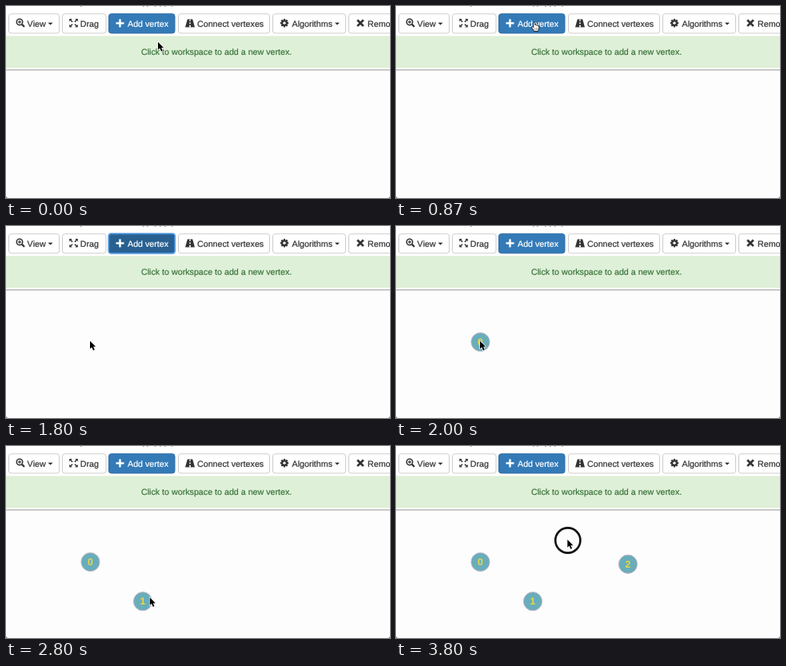
Recreate the animation shown at these times as an HTML page with a canvas. Size 480 by 240 pixels, loop 3870 ms.

```html
<!DOCTYPE html>
<html lang="en">
<head>
<meta charset="utf-8">
<title>Adding vertexes</title>
<style>
html, body { margin: 0; width: 100%; height: 100%; overflow: hidden; background: #fff; }
canvas { display: block; width: 480px; height: 240px; }
</style>
</head>
<body>
<canvas id="stage" width="480" height="240"></canvas>
<script>
const ctx = document.getElementById('stage').getContext('2d');
const LOOP = 3870, FPS = 15;
const FONT = '"Liberation Sans", Arial, sans-serif';
const INK = '#333';

// Pointer tip: time, x, y
const PATH = [
  [0, 190, 45], [200, 190, 45], [800, 173, 20], [1200, 171, 21.5], [1580, 171, 21.5],
  [1800, 105, 143.7], [2130, 105, 143.7], [2330, 170, 193], [2730, 170, 193],
  [3130, 289.5, 147], [3400, 289.5, 147], [3730, 214.3, 117], [LOOP, 214.3, 117]
];
const VERTEXES = [
  { x: 105.5, y: 145, born: 1995 },
  { x: 171, y: 194.2, born: 2460 },
  { x: 290, y: 147.7, born: 3195 }
];
const RINGS = [
  { x: 105, y: 145, from: 1860, to: 1995 },
  { x: 214.8, y: 118, from: 3795, to: LOOP }
];
const FOCUS = { from: 1195, to: 1860 };

const during = (t, span) => t >= span.from && t < span.to;

function pointerAt(t) {
  const i = PATH.findIndex(p => p[0] > t);
  const a = PATH[i - 1], b = PATH[i];
  const u = (t - a[0]) / (b[0] - a[0]);
  const e = u * u * (3 - 2 * u);
  return { x: a[1] + (b[1] - a[1]) * e, y: a[2] + (b[2] - a[2]) * e };
}

function label(text, x, y, color = INK) {
  ctx.font = '10.7px ' + FONT;
  ctx.fontKerning = 'none';
  ctx.textRendering = 'geometricPrecision';
  ctx.textAlign = 'left';
  ctx.fillStyle = ctx.strokeStyle = color;
  ctx.lineWidth = 0.22;
  ctx.fillText(text, x, y);
  ctx.strokeText(text, x, y);
}

function poly(points, color) {
  ctx.beginPath();
  points.forEach(p => ctx.lineTo(p[0], p[1]));
  ctx.closePath();
  ctx.fillStyle = color;
  ctx.fill();
}

function line(x1, y1, x2, y2, color, width) {
  ctx.beginPath();
  ctx.moveTo(x1, y1);
  ctx.lineTo(x2, y2);
  ctx.strokeStyle = color;
  ctx.lineWidth = width;
  ctx.stroke();
}

function circle(x, y, r) {
  ctx.beginPath();
  ctx.arc(x, y, r, 0, Math.PI * 2);
}

function box(x, w, fill, stroke, width = 1) {
  ctx.beginPath();
  ctx.roundRect(x, 9.8, w, 24.2, 3);
  ctx.fillStyle = fill;
  ctx.fill();
  ctx.strokeStyle = stroke;
  ctx.lineWidth = width;
  ctx.stroke();
}

const caret = x => poly([[x, 20.7], [x + 6, 20.7], [x + 3, 23.7]], INK);

function zoomIcon(x, y) {
  circle(x - 1, y - 1, 3.7);
  ctx.strokeStyle = INK;
  ctx.lineWidth = 1.6;
  ctx.stroke();
  line(x + 1.9, y + 1.9, x + 5, y + 5, INK, 2.2);
  line(x - 3, y - 1, x + 1, y - 1, INK, 1.2);
  line(x - 1, y - 3, x - 1, y + 1, INK, 1.2);
}

function expandIcon(x, y) {
  for (const sx of [-1, 1]) for (const sy of [-1, 1]) {
    const at = (a, b) => [x + sx * a, y + sy * b];
    poly([at(5.3, 5.3), at(1.8, 5.3), at(5.3, 1.8)], INK);
    line(...at(1.4, 1.4), ...at(4, 4), INK, 1.4);
  }
}

function plusIcon(x, y) {
  line(x - 5, y, x + 5, y, '#fff', 2.4);
  line(x, y - 5, x, y + 5, '#fff', 2.4);
}

function roadIcon(x, y) {
  poly([[x - 3.2, y - 5], [x + 3.2, y - 5], [x + 6, y + 5], [x - 6, y + 5]], INK);
  line(x, y - 5, x, y - 2.5, '#fff', 1.3);
  line(x, y - 1, x, y + 1, '#fff', 1.5);
  line(x, y + 2.6, x, y + 5, '#fff', 1.8);
}

function cogIcon(x, y) {
  for (let i = 0; i < 4; i++) {
    const a = i * Math.PI / 4, dx = Math.cos(a) * 5.2, dy = Math.sin(a) * 5.2;
    line(x - dx, y - dy, x + dx, y + dy, INK, 2.2);
  }
  circle(x, y, 3.9);
  ctx.fillStyle = INK;
  ctx.fill();
  circle(x, y, 1.7);
  ctx.fillStyle = '#fff';
  ctx.fill();
}

function crossIcon(x, y) {
  line(x - 3.8, y - 3.8, x + 3.8, y + 3.8, INK, 2.7);
  line(x - 3.8, y + 3.8, x + 3.8, y - 3.8, INK, 2.7);
}

function toolbar(focused) {
  // Descenders of the text line cut off by the top edge
  ctx.fillStyle = '#999';
  for (const x of [93, 171, 176, 186, 192, 198, 207]) ctx.fillRect(x, 0, 1.5, 1);

  box(3.5, 63, '#fff', '#ccc');
  zoomIcon(18, 21);
  label('View', 26.5, 25.5);
  caret(52.5);

  box(70.5, 54.5, '#fff', '#ccc');
  expandIcon(84.5, 21.3);
  label('Drag', 92.8, 25.5);

  if (focused) {
    box(128.5, 82.5, '#286090', 'rgba(91, 157, 217, 0.45)', 3);
    box(128.5, 82.5, '#286090', '#4a94dd', 1.4);
  } else {
    box(128.5, 82.5, '#337ab7', '#2e6da4');
  }
  plusIcon(142.5, 21.5);
  label('Add vertex', 152, 25.5, '#fff');

  box(215.5, 114, '#fff', '#ccc');
  roadIcon(230, 21.5);
  label('Connect vertexes', 239, 25.5);

  box(333.5, 91, '#fff', '#ccc');
  cogIcon(348, 21.3);
  label('Algorithms', 357.5, 25.5);
  caret(411);

  box(428.5, 80, '#fff', '#ccc');
  crossIcon(443, 21.3);
  label('Remove', 452, 25.5);
}

function page(focused) {
  ctx.fillStyle = '#fff';
  ctx.fillRect(0, 0, 480, 240);
  toolbar(focused);
  ctx.fillStyle = '#d6e9c6';
  ctx.fillRect(0, 37.6, 480, 39.4);
  ctx.fillStyle = '#dff0d8';
  ctx.fillRect(0, 38.2, 480, 38.2);
  label('Click to workspace to add a new vertex.', 169, 61, '#3c763d');
  ctx.fillStyle = '#fefdfe';
  ctx.fillRect(0, 80, 480, 160);
  line(0, 79.8, 480, 79.8, '#aaa', 1.2);
  poly([[0, 238], [2, 240], [0, 240]], '#888');
  poly([[480, 238], [478, 240], [480, 240]], '#888');
}

function vertex(v, name) {
  circle(v.x, v.y, 11.6);
  ctx.fillStyle = '#68aeba';
  ctx.fill();
  ctx.strokeStyle = '#c7b7c7';
  ctx.lineWidth = 1;
  ctx.stroke();
  ctx.font = 'bold 12.2px ' + FONT;
  ctx.textAlign = 'center';
  ctx.fillStyle = '#f0d543';
  ctx.fillText(name, v.x, v.y + 4.2);
}

function ring(r) {
  circle(r.x, r.y, 15.6);
  ctx.strokeStyle = '#111';
  ctx.lineWidth = 2.6;
  ctx.stroke();
}

const ARROW = new Path2D('M0 0V11.2L2.6 8.8L4.6 13.4L6.6 12.5L4.7 8.1H8.1Z');
const HAND = new Path2D('M-1.2 1Q0 -1.2 1.2 1V4.2Q2.6 3.5 3.2 4.7Q4.6 4.1 5.1 5.3Q6.8 5 6.8 7V9Q6.6 10.6 5.6 11.6V13H-.6V11.8L-4 7.8Q-4.4 6 -2.6 6.5L-1.2 7.8Z');

function pointer(p) {
  const hand = p.x > 128 && p.x < 211 && p.y > 9 && p.y < 35;
  ctx.save();
  ctx.translate(p.x, p.y);
  ctx.scale(0.88, 0.88);
  ctx.lineJoin = 'round';
  ctx.strokeStyle = hand ? '#111' : '#fff';
  ctx.lineWidth = hand ? 1 : 1.5;
  ctx.fillStyle = hand ? '#fff' : '#000';
  if (hand) {
    ctx.fill(HAND);
    ctx.stroke(HAND);
    for (const x of [1, 2.9, 4.7]) line(x, 8.4, x, 11, '#333', 0.6);
  } else {
    ctx.stroke(ARROW);
    ctx.fill(ARROW);
  }
  ctx.restore();
}

function draw(t) {
  page(during(t, FOCUS));
  VERTEXES.forEach((v, i) => { if (t >= v.born) vertex(v, String(i)); });
  RINGS.filter(r => during(t, r)).forEach(ring);
  pointer(pointerAt(t));
}

const start = performance.now();
function tick() {
  const t = (performance.now() - start) % LOOP;
  draw(Math.floor((t + 4) * FPS / 1000) * 1000 / FPS % LOOP);
  requestAnimationFrame(tick);
}
tick();
</script>
</body>
</html>
```
